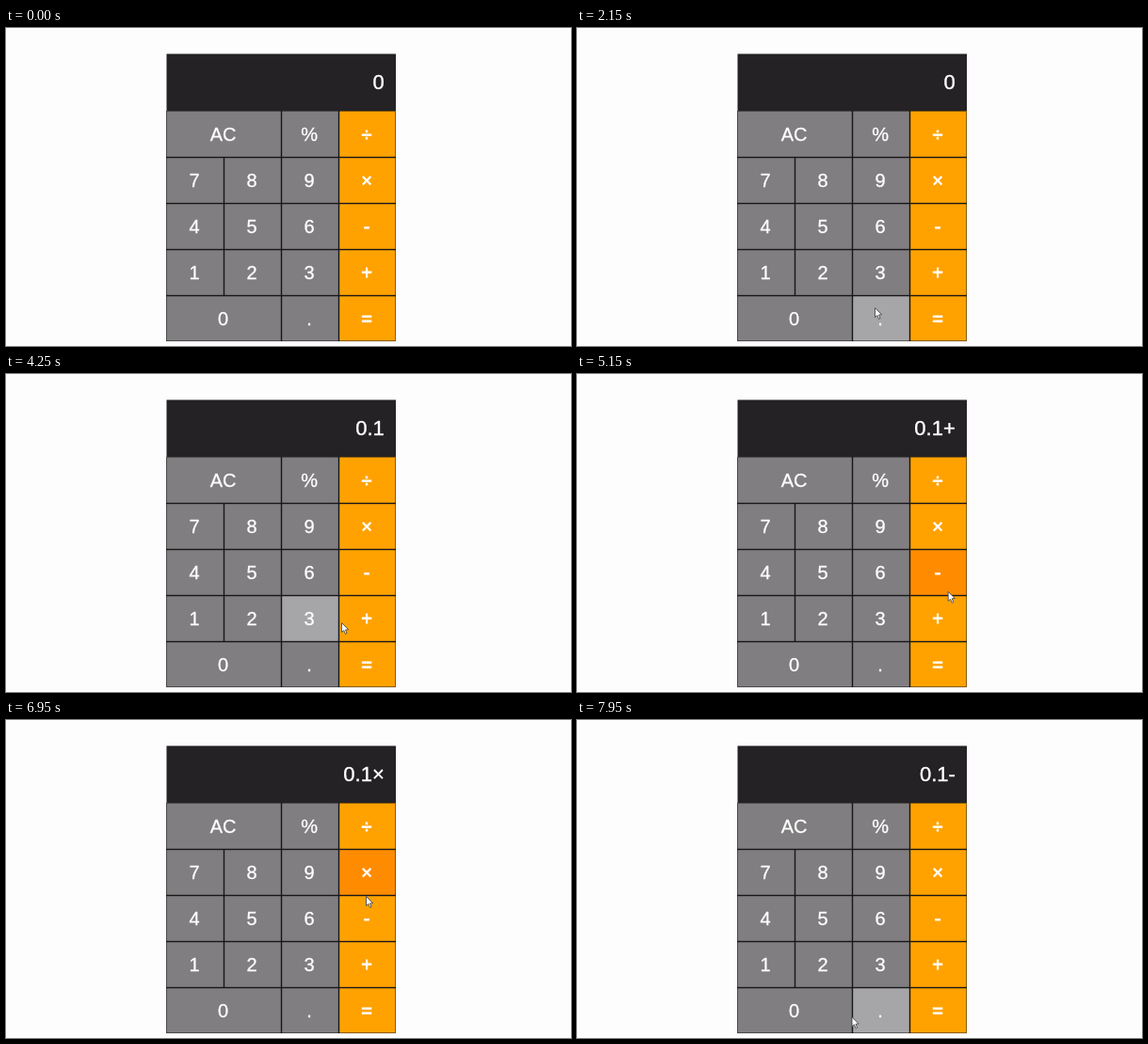
These frames come from a looping animation (600 by 338 pixels, 8000 ms). An HTML page with a canvas:

```html
<!DOCTYPE html>
<html lang="en">
<head>
<meta charset="utf-8">
<title>Calculator</title>
<style>
  html, body { margin: 0; width: 100%; height: 100%; overflow: hidden; background: #fefdfe; }
  canvas { display: block; width: 600px; height: 338px; }
</style>
</head>
<body>
<canvas id="stage" width="600" height="338"></canvas>
<script>
const ctx = document.getElementById('stage').getContext('2d');
const LOOP = 8000, STEP = 50, HOVER_LAG = 30;
const LEFT = 170, TOP = 27.5, KEYS_TOP = 88, KEY_W = 61, KEY_H = 49;
const RIGHT = LEFT + KEY_W * 4, BOTTOM = KEYS_TOP + KEY_H * 5;
const LINE = '#181617';

// A row of three labels starts with a double-width key.
const keys = ['AC % ÷', '7 8 9 ×', '4 5 6 -', '1 2 3 +', '0 . ='].flatMap((row, r) => {
  const labels = row.split(' ');
  const extra = 4 - labels.length;
  return labels.map((label, i) => ({
    label,
    x: LEFT + KEY_W * (i ? i + extra : 0),
    y: KEYS_TOP + KEY_H * r,
    w: KEY_W * (i ? 1 : 1 + extra),
    operator: i === labels.length - 1
  }));
});

// Where the pointer comes to rest, and the key it presses there.
const stops = [
  { t: 900, x: 386, y: 262 },
  { t: 2150, x: 316, y: 297 },
  { t: 3200, x: 316, y: 297, press: '.' },
  { t: 3700, x: 199, y: 242, press: '1' },
  { t: 4400, x: 377, y: 267, press: '+' },
  { t: 5300, x: 395, y: 228, press: '-' },
  { t: 5700, x: 388, y: 165, press: '×' },
  { t: 6100, x: 384, y: 118, press: '÷' },
  { t: 6550, x: 382, y: 187, press: '×' },
  { t: 6950, x: 382, y: 187 },
  { t: 7700, x: 373, y: 231, press: '-' },
  { t: LOOP, x: 285, y: 322 }
];

function pointerAt(t) {
  const i = Math.max(1, stops.findIndex(s => s.t >= t));
  const a = stops[i - 1], b = stops[i];
  const u = Math.max(0, (t - a.t) / (b.t - a.t));
  const s = u * u * (3 - 2 * u);
  return { x: a.x + (b.x - a.x) * s, y: a.y + (b.y - a.y) * s };
}

// A newly pressed operator replaces the one before it.
function readingAt(t) {
  return stops.filter(s => s.press && s.t < t).reduce((text, { press }) =>
    ('+-×÷'.includes(press) ? text.replace(/[-+×÷]$/, '') : text) + press, '0');
}

function write(text, x, y, size, align, weight) {
  ctx.font = size + 'px "Liberation Sans", Arial, sans-serif';
  ctx.textAlign = align;
  ctx.fillStyle = ctx.strokeStyle = '#fff';
  ctx.lineWidth = weight;
  ctx.fillText(text, x, y);
  ctx.strokeText(text, x, y);
}

function drawKey({ x, y, w, label, operator }, hovered) {
  ctx.fillStyle = operator ? (hovered ? '#ff8c00' : '#ffa200')
                           : (hovered ? '#a6a5a7' : '#807e80');
  ctx.fillRect(x, y, w, KEY_H);
  ctx.fillStyle = LINE;
  if (x > LEFT) ctx.fillRect(x - 0.2, y, 1.4, KEY_H);
  if (y > KEYS_TOP) ctx.fillRect(x, y - 0.2, w, 1.4);
  write(label, x + w / 2 - 0.4, y + 31.6, 20, 'center', operator ? 0.8 : 0.3);
}

function drawPointer({ x, y }) {
  ctx.save();
  ctx.translate(x + 0.5, y + 0.5);
  ctx.beginPath();
  [[0, 0], [0, 10], [2.3, 7.9], [4, 11.8], [5.6, 11.1], [4, 7.4], [7.2, 7.2]]
    .forEach(p => ctx.lineTo(...p));
  ctx.closePath();
  ctx.fillStyle = '#fff';
  ctx.strokeStyle = '#4a494b';
  ctx.lineWidth = 0.9;
  ctx.fill();
  ctx.stroke();
  ctx.restore();
}

function draw(t) {
  ctx.fillStyle = '#fefdfe';
  ctx.fillRect(0, 0, 600, 338);
  ctx.fillStyle = '#242224';
  ctx.fillRect(LEFT + 0.5, TOP, RIGHT - LEFT - 0.5, KEYS_TOP - TOP);
  write(readingAt(t), 401.8, 65, 22, 'right', 0.4);

  const visible = t >= stops[0].t;
  const { x, y } = pointerAt(t - HOVER_LAG);
  const hotY = y - 2;
  for (const key of keys) {
    const inside = x >= key.x && x < key.x + key.w &&
                   hotY >= key.y && hotY < key.y + KEY_H;
    drawKey(key, visible && inside);
  }
  ctx.globalAlpha = 0.5;
  ctx.strokeStyle = LINE;
  ctx.lineWidth = 1;
  ctx.strokeRect(LEFT + 0.5, KEYS_TOP + 0.5, RIGHT - LEFT - 1, BOTTOM - KEYS_TOP - 1);
  ctx.globalAlpha = 1;
  if (visible) drawPointer(pointerAt(t));
}

function frame() {
  draw(Math.floor(performance.now() % LOOP / STEP) * STEP);
  requestAnimationFrame(frame);
}
frame();
</script>
</body>
</html>
```
